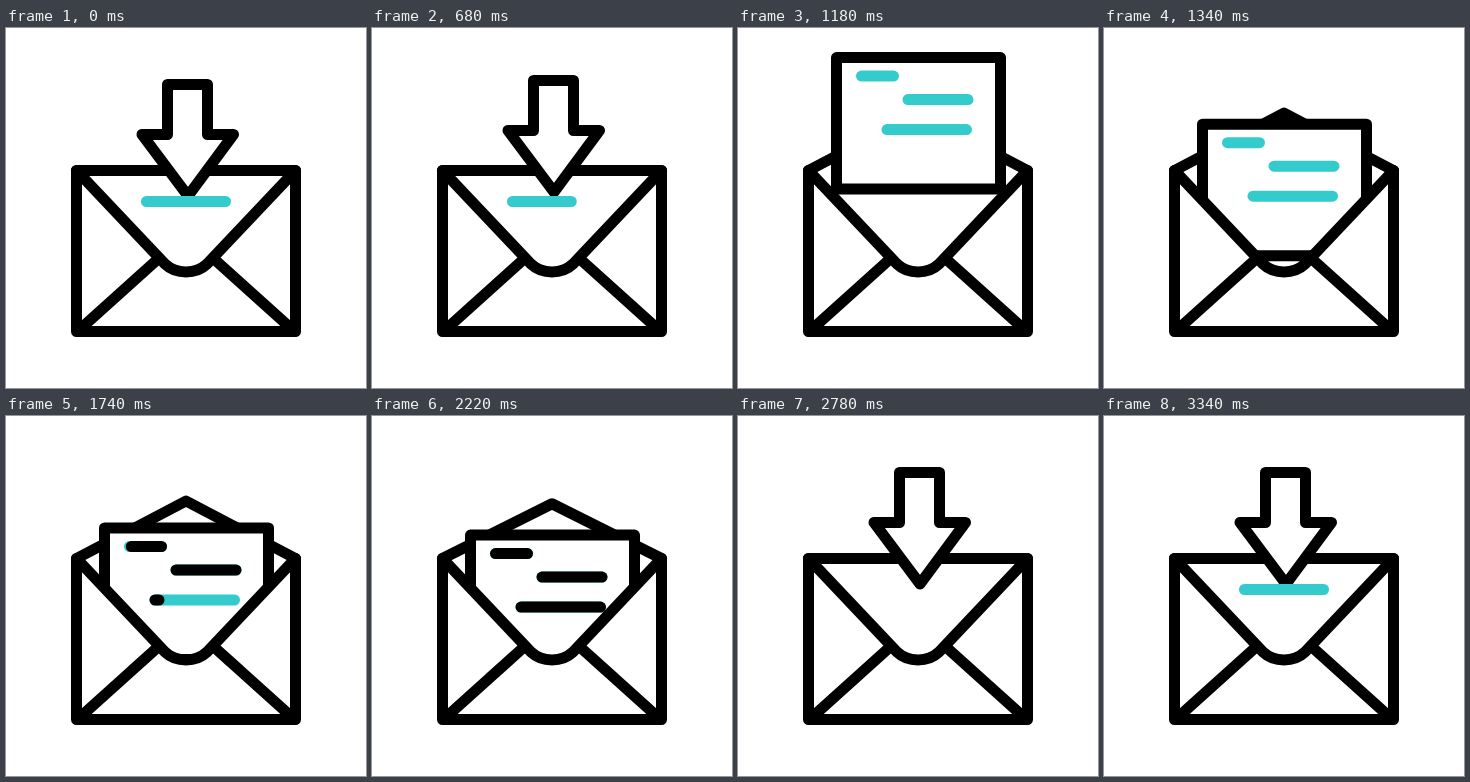
An HTML page for the animation above (3.54 s loop, 360x360 px).

```html
<!DOCTYPE html>
<html lang="en">
<head>
<meta charset="utf-8">
<title>Mail</title>
<style>
  html, body { margin: 0; height: 100%; overflow: hidden; background: #fff; }
  svg { display: block; width: 100vw; height: 100vh; }
  path, line, rect { stroke: #000; stroke-width: 11; stroke-linecap: round; stroke-linejoin: round; }
  path, rect { fill: #fff; }
  .teal { stroke: #33cbcb; }
  .ray { stroke-width: 6; }
</style>
</head>
<body>
<svg viewBox="0 0 360 360">
  <clipPath id="room"><path d="M0 0H360V300H0Z"/></clipPath>
  <path id="flap"/>
  <g clip-path="url(#room)">
    <g id="paper">
      <rect x="98.5" y="0" width="164" height="131.5"/>
      <g id="text"></g>
    </g>
  </g>
  <path d="M70.5 142.5L159 236C170 246.5 190 246.5 201 236L289.5 142.5V303.5H70.5Z"/>
  <path d="M152 231L72 303M208 231L288 303"/>
  <path id="arrow" d="M161.5 56.5H201.5V106.5H227.5L182 168L136 106.5H161.5Z"/>
  <line id="dash" class="teal"/>
  <g id="rays"></g>
</svg>
<script>
const LOOP = 3540, STEP = 20;
const $ = id => document.getElementById(id);
const lerp = (a, b, p) => a + (b - a) * p;
const ramp = (t, a, b) => Math.min(1, Math.max(0, (t - a) / (b - a)));
const sine = (t, a, b) => 0.5 - 0.5 * Math.cos(Math.PI * ramp(t, a, b));

function addLine(parent, className) {
  const el = document.createElementNS('http://www.w3.org/2000/svg', 'line');
  el.setAttribute('class', className);
  return parent.appendChild(el);
}

function setLine(el, x1, y1, x2, y2) {
  const empty = Math.hypot(x2 - x1, y2 - y1) < 0.01;
  el.style.display = empty ? 'none' : '';
  Object.entries({ x1, y1, x2, y2 }).forEach(([k, v]) => el.setAttribute(k, v));
}

const shift = (el, y) => el.setAttribute('transform', `translate(0 ${y})`);

// Text lines: black ink runs over the teal, from one end to the other
const lines = [
  { from: 155.5, to: 123.5, y: 18.5, start: 1500, end: 1755 },
  { from: 170, to: 230, y: 42, start: 1460, end: 1700 },
  { from: 149, to: 228.5, y: 72, start: 1727, end: 1985 }
];
for (const l of lines) {
  setLine(addLine($('text'), 'teal'), l.from, l.y, l.to, l.y);
  l.ink = addLine($('text'), '');
}

// Short strokes thrown outwards as the arrow lands
const rays = [
  [60, 118, 44, 78], [54, 215, 30, 215], [56, 290, 36, 300],
  [296, 120, 308, 80], [302, 215, 319, 215], [303, 290, 314, 298]
].map(ends => ({ ends, el: addLine($('rays'), 'teal ray') }));

function draw(t) {
  const apex = 142.5 - 57.5 * (sine(t, 720, 960) - sine(t, 2153, 2633));
  $('flap').setAttribute('d', `M70.5 142.5L180 ${apex}L289.5 142.5`);

  const top = -142 + 254 * sine(t, 744, 1454) + 160 * sine(t, 2134, 2774);
  shift($('paper'), top);
  $('text').setAttribute('opacity', 1 - ramp(t, 2360, 2520));
  for (const l of lines) {
    const x = lerp(l.from, l.to, ramp(t, l.start, l.end));
    setLine(l.ink, l.from, l.y, x, l.y);
  }

  const n = Math.max(0, (t - 660) / STEP);
  const rise = t < 1500 ? Math.min(185, 4 * n ** 1.7) : 185 * (1 - sine(t, 2377, 2677));
  shift($('arrow'), -rise);

  const full = t < 1500 ? 1 - ramp(t, 660, 738) : sine(t, 2820, 3080);
  setLine($('dash'), 140.5, 173.5, lerp(140.5, 219.5, full), 173.5);

  const head = sine(t, 2830, 3120), tail = sine(t, 3000, 3340);
  for (const { ends: [x1, y1, x2, y2], el } of rays) {
    setLine(el, lerp(x1, x2, tail), lerp(y1, y2, tail), lerp(x1, x2, head), lerp(y1, y2, head));
  }
}

const began = performance.now();
function tick() {
  const t = (performance.now() - began) % LOOP;
  // the picture changes in 20 ms steps
  draw(Math.floor(t / STEP) * STEP);
  requestAnimationFrame(tick);
}
tick();
</script>
</body>
</html>
```
